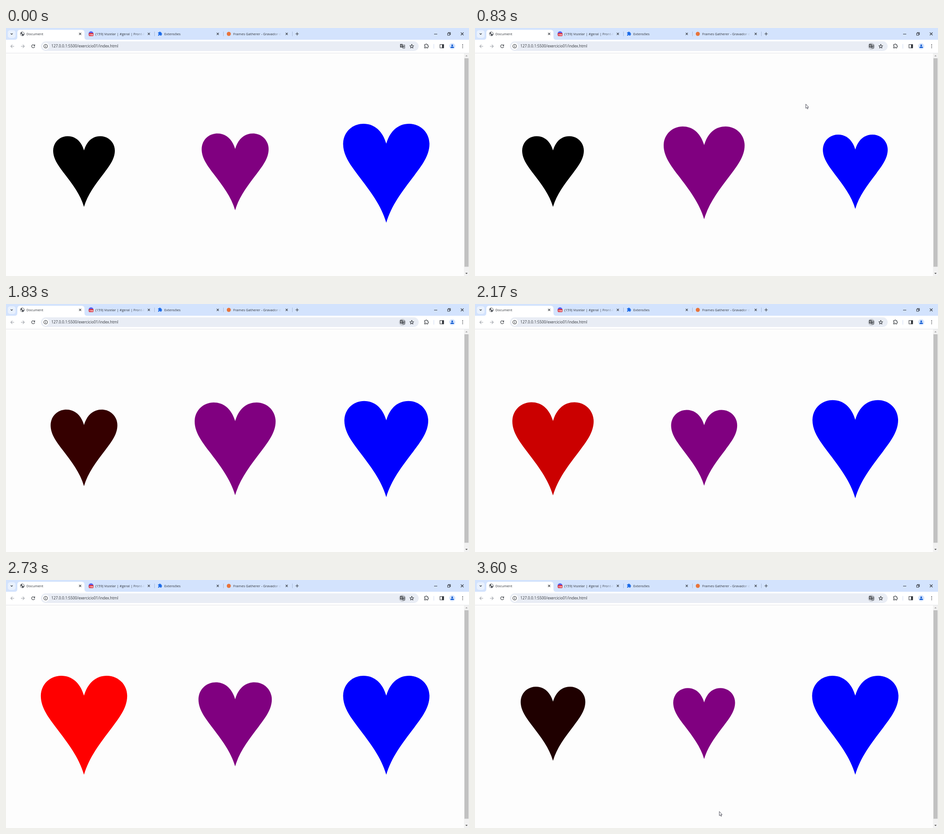
An HTML page that plays this animation: 1021 px wide and 549 px high, repeating every 3.63 s.

```html
<!DOCTYPE html>
<html lang="pt">
<head>
<meta charset="utf-8">
<title>Document</title>
<style>
html, body { margin: 0; width: 100%; height: 100%; overflow: hidden; background: #fdfdfd; }
svg { display: block; }
text { font: 7.6px "Open Sans", "Noto Sans", sans-serif; fill: #30343a; }
.url { font-size: 8.35px; }
.line { fill: none; stroke: #30343a; stroke-width: 1.1; }
.dim { stroke: #a3a7ad; }
</style>
</head>
<body>
<svg width="1021" height="549" viewBox="0 0 1021 549">
  <defs>
    <linearGradient id="fade">
      <stop offset="0" stop-color="#d3e3fd" stop-opacity="0"/>
      <stop offset="1" stop-color="#d3e3fd"/>
    </linearGradient>
    <path id="heart" d="M0-37.5C6-58 19-69 36-69C54-69 68-55 68-37C68-18 55-2 44 13C25 38 8 60 0 87.5C-8 60-25 38-44 13C-55-2-68-18-68-37C-68-55-54-69-36-69C-19-69-6-58 0-37.5Z"/>
    <path id="close" class="line" d="M-2.3-2.3L2.3 2.3M2.3-2.3L-2.3 2.3"/>
    <path id="puzzle" d="M-4-3H-1.7A1.5 1.5 0 0 1 1.3-3H3.2V-.7A1.5 1.5 0 0 1 3.2 2.3V4.5H1A1.4 1.4 0 0 0-1.8 4.5H-4V2.2A1.4 1.4 0 0 0-4-.6Z"/>
  </defs>

  <!-- tab strip -->
  <path fill="#d3e3fd" d="M0 0H1021V27H0Z"/>
  <rect x="4" y="5" width="17" height="17" rx="5" fill="#e9f1fe"/>
  <path class="line" d="M10.3 12L12.5 14.2L14.7 12"/>
  <path fill="#fff" d="M19 26Q25 26 25 20V10Q25 4 31 4H167Q173 4 173 10V20Q173 26 179 26Z"/>
  <circle cx="36" cy="13" r="4.7" fill="#50545a"/>
  <path fill="#fff" d="M32.3 12.2L35 14.2V17Q32 16 32.3 12.2ZM35.5 9.3L38 9.2L39.8 12L38 14.5L37 12.8L35 12Z"/>
  <text x="45" y="16">Document</text>
  <circle cx="187.5" cy="12.5" r="5.3" fill="#5865f2"/>
  <rect x="182.5" y="11" width="10.5" height="7" rx="2" fill="#d9232e"/>
  <text x="187.7" y="16.5" text-anchor="middle" style="font-size:5.3px;font-weight:700;fill:#fff">159</text>
  <text x="197" y="16">(159) Vozelar | #geral | Front-En</text>
  <use href="#puzzle" x="339.5" y="12.5" fill="#1a6ae8"/>
  <text x="349" y="16">Extensões</text>
  <circle cx="491.3" cy="13" r="4.5" fill="#e8743b"/>
  <text x="501" y="16">Frames Gatherer - Gravador de</text>
  <path fill="url(#fade)" d="M288 6H306V21H288Z"/>
  <path fill="url(#fade)" d="M590 6H607V21H590Z"/>
  <path fill="#d3e3fd" d="M305.5 6H311V21H305.5ZM606.5 6H614V21H606.5Z"/>
  <use href="#close" x="163.5" y="13"/>
  <use href="#close" x="315" y="13"/>
  <use href="#close" x="467" y="13"/>
  <use href="#close" x="619" y="13"/>
  <path stroke="#a9bad6" d="M327.5 8V18M479.5 8V18M631.5 8V18"/>
  <path class="line" d="M638.5 13H645.5M642 9.5V16.5M944 13.5H951"/>
  <path class="line" d="M974 11.5H978.5V16H974ZM975.5 11.3V10H980V14.5H978.7"/>
  <path class="line" d="M1003 10L1009 16M1009 10L1003 16"/>

  <!-- toolbar -->
  <path fill="#fff" d="M0 26H1021V55H0Z"/>
  <path stroke="#e3e5e8" d="M0 55.5H1021"/>
  <path class="line dim" d="M18 40.5H10.5M14 37L10.5 40.5L14 44M33 40.5H40.5M37 37L40.5 40.5L37 44"/>
  <path class="line" d="M62.7 38.3A3.4 3.4 0 1 0 63.3 41.2M63.4 36.5V39.2H60.7"/>
  <rect x="77" y="29.5" width="833" height="21.5" rx="10.7" fill="#e9edf5"/>
  <circle cx="87.5" cy="40.3" r="7.5" fill="#fff"/>
  <circle class="line" cx="87.5" cy="40.3" r="4"/>
  <path class="line" d="M87.5 39.8V42.5M87.5 38V39"/>
  <text class="url" x="100" y="43.4">127.0.0.1:5500/exercicio01/index.html</text>
  <circle id="halo" cx="874" cy="40.3" r="7.5" fill="#c6cad1"/>
  <path fill="#474b51" d="M869 35.5H874.5L876.5 43H869Z"/>
  <path fill="none" stroke="#fff" stroke-width=".8" d="M873.6 39.4H871.8M873.5 38A1.7 1.7 0 1 0 873.5 40.5"/>
  <path fill="none" stroke="#474b51" stroke-width=".9" d="M875.5 37.5H879.3V45H875L874.5 43M876 40H879M878.2 40Q877.5 42 876 43M876.5 41L878.3 43"/>
  <path class="line" d="M894.8 36L896 39L899.2 39.2L896.7 41.3L897.5 44.4L894.8 42.7L892.1 44.4L892.9 41.3L890.4 39.2L893.6 39Z" stroke-linejoin="round"/>
  <use href="#puzzle" x="927" y="39.8" class="line"/>
  <path stroke="#cfdcf2" d="M943.5 35.5V45.5"/>
  <path class="line" d="M957 36.5H965V44H957Z"/>
  <path fill="#30343a" d="M961.5 36H965.5V44.5H961.5Z"/>
  <circle cx="984" cy="40.3" r="6.7" fill="#d3e3fd"/>
  <circle cx="984" cy="38.4" r="1.9" fill="#0b57d0"/>
  <path fill="#0b57d0" d="M980.2 44V43Q980.5 41 984 41T987.8 43V44Z"/>
  <g fill="#30343a"><circle cx="1007" cy="37" r=".9"/><circle cx="1007" cy="40.3" r=".9"/><circle cx="1007" cy="43.6" r=".9"/></g>

  <!-- scrollbar -->
  <path fill="#f1f1f1" d="M1010 56H1021V549H1010Z"/>
  <path fill="#c1c1c1" d="M1011 67H1020V528.5H1011Z"/>
  <path fill="#a3a3a3" d="M1013 62.7L1015.5 60L1018 62.7Z"/>
  <path fill="#505050" d="M1013 542L1015.5 544.7L1018 542Z"/>

  <use class="heart" href="#heart"/>
  <use class="heart" href="#heart" fill="#800080"/>
  <use class="heart" href="#heart" fill="#0000ff"/>
  <path id="cursor" fill="#fff" stroke="#3b3d4a" stroke-width=".9" d="M.5.5V9.8L2.6 7.9L4.1 11.2L5.6 10.5L4.1 7.4H6.7Z"/>
</svg>
<script>
const LOOP = 3630, HOLD = 130, RELOAD = 590, ENTER = 1670, LEAVE = 3005;
const hearts = document.querySelectorAll('.heart');
const halo = document.getElementById('halo');
const cursor = document.getElementById('cursor');
const clamp = v => Math.min(1, Math.max(0, v));

// CSS "ease": cubic-bezier(.25, .1, .25, 1)
function ease(x) {
  x = clamp(x);
  const curve = (s, a, b) => 3 * (1 - s) ** 2 * s * a + 3 * (1 - s) * s * s * b + s ** 3;
  let low = 0, high = 1;
  for (let i = 0; i < 24; i++) {
    const mid = (low + high) / 2;
    if (curve(mid, .25, .25) < x) low = mid; else high = mid;
  }
  return curve(low, .1, 1);
}

// [time, x, y] stops of each visible stretch of the pointer
const trips = [
  [[760, 729, 168], [930, 729, 168]],
  [[3020, 255, 385], [3230, 474, 489], [3300, 525, 508], [3600, 538.5, 512], [LOOP, 538.5, 512]]
];

function pointer(t) {
  for (const trip of trips)
    for (let i = 1; i < trip.length; i++) {
      const [t0, x0, y0] = trip[i - 1], [t1, x1, y1] = trip[i];
      if (t >= t0 && t < t1) {
        const k = (t - t0) / (t1 - t0);
        return [x0 + (x1 - x0) * k, y0 + (y1 - y0) * k];
      }
    }
}

function draw(t) {
  t = t < HOLD ? 0 : HOLD + Math.floor((t - HOLD) * .03 + .001) / .03;
  const loaded = t >= RELOAD - 1;
  const hover = t < LEAVE ? ease((t - ENTER) / 1000) : 1 - ease((t - LEAVE) / 1000);
  const beat = ease((loaded ? Math.max(0, t - RELOAD) : t + 82) % 500 / 500);
  const grow = loaded ? ease((t - RELOAD) / 2000) : 1;

  [hover, beat, grow].forEach((p, i) =>
    hearts[i].setAttribute('transform', `translate(${172 + 333.3 * i} 308.5) scale(${1 + .4 * p})`));
  hearts[0].setAttribute('fill', `rgb(${Math.round(255 * hover)},0,0)`);
  halo.style.display = loaded ? '' : 'none';

  const at = pointer(t);
  cursor.style.display = at ? '' : 'none';
  if (at) cursor.setAttribute('transform', `translate(${at})`);
}

const start = performance.now();
function tick() {
  draw((performance.now() - start) % LOOP);
  requestAnimationFrame(tick);
}
tick();
</script>
</body>
</html>
```
